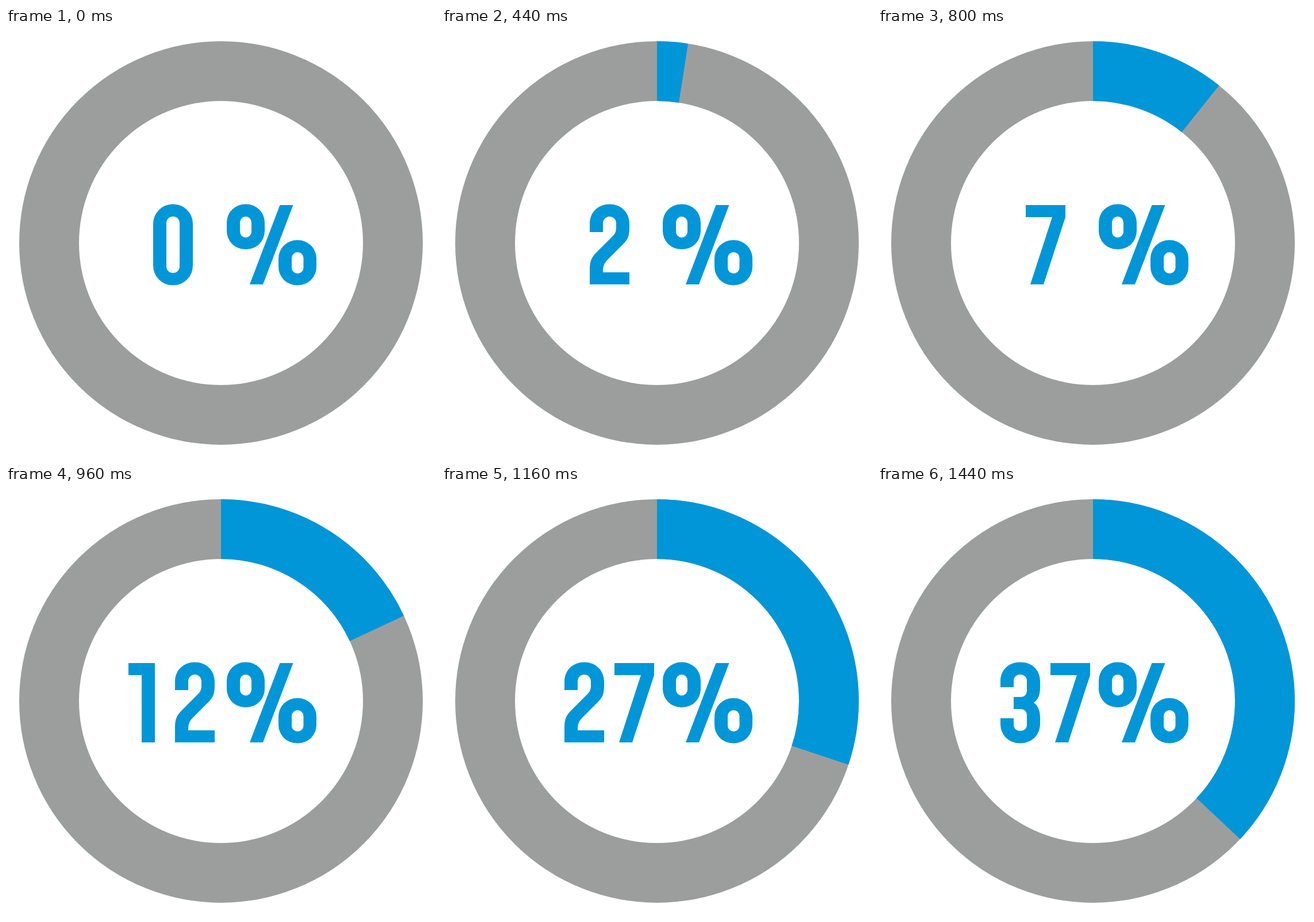
An HTML page with a canvas for the animation above (1880 ms loop, 748 px wide and 748 px high).

```html
<!DOCTYPE html>
<html lang="en">
<head>
<meta charset="utf-8">
<title>Percentage ring</title>
<style>
  html, body { margin: 0; width: 100%; height: 100%; overflow: hidden; background: #fff; }
  canvas { display: block; }
</style>
</head>
<body>
<canvas id="stage" width="748" height="748" role="img" aria-label="Ring counting up to 37 %"></canvas>
<script>
const ctx = document.getElementById('stage').getContext('2d');
const BLUE = '#0096d8', GRAY = '#9c9e9d';
const LOOP = 1880, RUN = 1440, STEP = 40, TARGET = 37;

// Rounded rectangle as path data
const box = (x, y, w, h, r) =>
  `M${x + r} ${y}h${w - 2 * r}a${r} ${r} 0 0 1 ${r} ${r}v${h - 2 * r}a${r} ${r} 0 0 1 ${-r} ${r}` +
  `h${2 * r - w}a${r} ${r} 0 0 1 ${-r} ${-r}v${2 * r - h}a${r} ${r} 0 0 1 ${r} ${-r}z`;

// Digit shapes: x starts at the digit's left edge, y is the stage position
const digits = [
  box(-1, 306.5, 69, 141, 34) + box(22, 328, 23, 98, 11),
  'M0 308H46V446H23V329H0Z',
  'M0 355V341C0 320 15 306.5 34.5 306.5S69 320 69 341V347C69 362 66 368 58 376L31 403C25 409 23 414 23 425' +
    'H69V446H0V420C0 404 4 398 13 389L40 362C45 357 46 353 46 346V340C46 333 41 328 34.5 328S23 333 23 340V355Z',
  'M0 350V340C0 319 15 306.5 34.5 306.5S69 319 69 340V350C69 364 65 372 58 377C65 382 69 390 69 404V413' +
    'C69 434 54 447.5 34.5 447.5S0 434 0 413V404H23V415C23 422 28 426 34.5 426S46 422 46 415V400' +
    'C46 392 42 388 35 388H23V367H35C42 367 46 363 46 355V339C46 332 41 328 34.5 328S23 332 23 339V350Z',
  'M23 308H46L19 382H46V348H69V446H46V404H-3V382Z',
  'M1 308H65V329H23V361C28 357 32 355 40 355C58 355 69 368 69 388V413C69 434 54 447.5 34.5 447.5' +
    'S0 434 0 413V404H23V415C23 422 28 426 34.5 426S46 422 46 415V388C46 380 41 376 34.5 376S23 380 23 386H1Z',
  'M34 308H58L40 359C58 360 69 372 69 390V413C69 434 54 447.5 34.5 447.5S0 434 0 413V396' +
    'C0 386 4 380 7 372Z' + box(23, 380, 23, 46, 11),
  'M0 308H69V329L31 446H8L46 329H0Z',
  'M34.5 306.5C54 306.5 69 319 69 340V350C69 364 65 372 58 377C65 382 69 390 69 404V413' +
    'C69 434 54 447.5 34.5 447.5S0 434 0 413V404C0 390 4 382 11 377C4 372 0 364 0 350V340' +
    'C0 319 15 306.5 34.5 306.5Z' + box(23, 328, 23, 39, 11) + box(23, 388, 23, 38, 11)
].map(d => new Path2D(d));

// Nine is six turned upside down
digits[9] = new Path2D();
digits[9].addPath(digits[6], new DOMMatrix([-1, 0, 0, -1, 69, 754]));

const percent = new Path2D(
  box(384, 306.5, 66, 78.5, 32) + box(407, 328, 20, 36.5, 10) +
  box(474, 369, 66, 78.5, 32) + box(497, 390, 20.5, 37, 10) +
  'M476.5 308H499.5L447 446H424Z');

// Bezier easing with control points (x1, 0) and (x2, 1)
function ease(x, x1, x2) {
  if (x >= 1) return 1;
  let lo = 0, hi = 1, u;
  for (let i = 0; i < 30; i++) {
    u = (lo + hi) / 2;
    const v = 1 - u;
    if (3 * v * v * u * x1 + 3 * v * u * u * x2 + u ** 3 < x) lo = u; else hi = u;
  }
  return u * u * (3 - 2 * u);
}

function ring(color, share) {
  const start = -Math.PI / 2;
  ctx.strokeStyle = color;
  ctx.lineWidth = 104;
  ctx.beginPath();
  ctx.arc(374, 374, 299, start, start + share * 2 * Math.PI);
  ctx.stroke();
}

function drawNumber(value) {
  const text = String(value);
  let x = text.length > 1 ? 213 : 257;
  ctx.fillStyle = BLUE;
  for (const char of text) {
    ctx.save();
    ctx.translate(x, 0);
    ctx.fill(digits[char], 'evenodd');
    ctx.restore();
    x += char === '1' ? 81 : 87;
  }
  ctx.fill(percent, 'evenodd');
}

function draw(now) {
  const time = Math.floor(now % LOOP / STEP) * STEP;
  const x = Math.min(time / RUN, 1);
  ctx.fillStyle = '#fff';
  ctx.fillRect(0, 0, 748, 748);
  ring(GRAY, 1);
  if (x > 0) ring(BLUE, TARGET / 100 * ease(x, 0.772, 0.687));
  drawNumber(Math.round(TARGET * ease(x, 0.98, 0.665)));
}

let begin;
function tick(now) {
  begin ??= now;
  draw(now - begin);
  requestAnimationFrame(tick);
}
draw(0);
requestAnimationFrame(tick);
</script>
</body>
</html>
```
